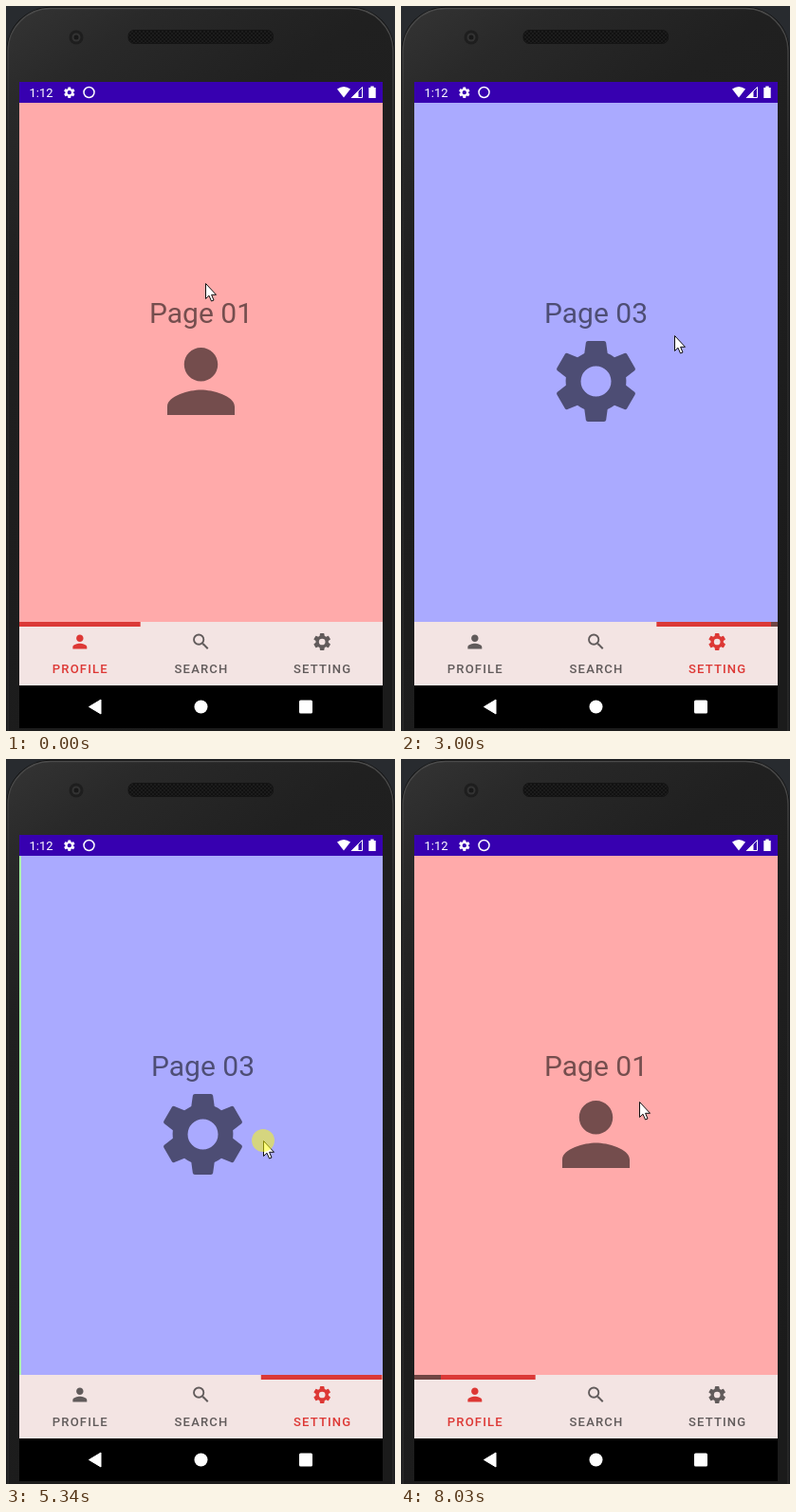
An HTML page for the animation above (9.47 s loop, 410x764 px).

```html
<!DOCTYPE html>
<html lang="en">
<head>
<meta charset="utf-8">
<title>Pager with tabs</title>
<style>
  html, body { margin: 0; width: 100%; height: 100%; overflow: hidden; background: #282b2f; }
  svg { display: block; width: 410px; height: 764px; font-family: Roboto, "Noto Sans", sans-serif; }
  .title { font-size: 30px; text-anchor: middle; }
  .ink { fill: #000; fill-opacity: .54; }
  .tab { fill: #615b5b; }
  .tab.on { fill: #dd3835; }
  .tab text { font-size: 13.05px; font-weight: 500; letter-spacing: 1.165px; text-anchor: middle; }
</style>
</head>
<body>
<svg viewBox="0 0 410 764">
  <defs>
    <linearGradient id="shell" x2=".35" y2="1">
      <stop offset="0" stop-color="#343434"/>
      <stop offset=".12" stop-color="#292929"/>
      <stop offset=".3" stop-color="#202020"/>
      <stop offset="1" stop-color="#1b1b1b"/>
    </linearGradient>
    <linearGradient id="rim" x2="0" y2="1">
      <stop offset="0" stop-color="#4a4a4a"/>
      <stop offset=".2" stop-color="#2b2b2b"/>
    </linearGradient>
    <pattern id="mesh" width="4" height="4" patternUnits="userSpaceOnUse">
      <rect width="4" height="4" fill="#1c1c1c"/>
      <circle cx="1" cy="1" r=".9" fill="#0b0b0b"/>
      <circle cx="3" cy="3" r=".9" fill="#0b0b0b"/>
    </pattern>
    <clipPath id="view"><rect x="14" y="102" width="383" height="614"/></clipPath>
    <path id="person" d="M12 12c2.21 0 4-1.79 4-4s-1.79-4-4-4-4 1.79-4 4 1.79 4 4 4zm0 2c-2.67 0-8 1.34-8 4v2h16v-2c0-2.66-5.33-4-8-4z"/>
    <g id="lens">
      <circle cx="9.5" cy="9.5" r="5.5" fill="none" stroke="currentColor" stroke-width="2"/>
      <path d="M14.23 14.43L15.5 13.900 20.490 19 19 20.490 14 15.500Z" fill="currentColor"/>
    </g>
    <path id="gear" fill-rule="evenodd"/>
  </defs>

  <!-- phone body -->
  <rect x=".5" y=".8" width="409" height="820" rx="47" fill="#0d0d0d"/>
  <rect x="2" y="2.500" width="406" height="820" rx="45" fill="url(#shell)" stroke="url(#rim)" stroke-width="1.500"/>
  <rect x="129" y="25.500" width="152.500" height="14" rx="6" fill="url(#mesh)" stroke="#141414"/>
  <circle cx="74" cy="33" r="7.500" fill="#1e1e1e"/>
  <circle cx="74" cy="33" r="4.500" fill="#333"/>
  <circle cx="74" cy="33" r="2.500" fill="#191919"/>

  <!-- status bar -->
  <rect x="14" y="80" width="383" height="22" fill="#3700b0"/>
  <g fill="#fff">
    <text x="24.500" y="95.500" font-size="13">1:12</text>
    <use href="#gear" transform="translate(59.600 84) scale(.6)"/>
    <circle cx="87.500" cy="91" r="5.500" fill="none" stroke="#fff" stroke-width="1.500"/>
    <path d="M349 87.500Q356 82.500 363 87.500L356 96.500Z"/>
    <path d="M375.500 85.500V96.500H364.500Z" fill="none" stroke="#fff"/>
    <path d="M371.500 89V97H363.500Z"/>
    <path d="M384.300 84.500h3.400v1.500h2v11h-7.400v-11h2z"/>
  </g>

  <g clip-path="url(#view)">
    <g id="pages"></g>
    <rect x="14" y="649" width="383" height="67" fill="#f3e4e3"/>
    <rect id="bar" y="649" height="5" fill="#db3937"/>
    <rect id="trail" y="649" height="5" fill="#704543"/>
    <g id="tabs"></g>
  </g>

  <!-- navigation bar -->
  <rect x="14" y="716" width="383" height="45" fill="#000"/>
  <g fill="#fff">
    <path d="M87.500 738.500L100 731V746Z" stroke="#fff" stroke-linejoin="round"/>
    <circle cx="205.500" cy="738.500" r="7"/>
    <rect x="309" y="731.500" width="14" height="14" rx="1.500"/>
  </g>

  <g id="pointer">
    <path d="M.5.500V16.500L4 13.200 6.500 19 9 18 6.600 12.300H11.500Z" fill="#fff" stroke="#111" stroke-linejoin="round"/>
    <circle id="press" r="12" fill="#ff0" opacity=".5"/>
  </g>
</svg>

<script>
const LOOP = 9470, STEP = LOOP / 130;
const LEFT = 14, WIDTH = 383, TAB = WIDTH / 3;
const SWIPE = 580, GLIDE = 160, PRESS = 185;
const $ = id => document.getElementById(id);

const tabs = [
  { label: "PROFILE", icon: "person", color: "#ffaaaa" },
  { label: "SEARCH", icon: "lens", color: "#aaffaa" },
  { label: "SETTING", icon: "gear", color: "#aaaaff" }
];

// The pointer arrives at x, y and from the time `at` swipes by dx, dy.
const swipes = [
  { arrive: 900, at: 1330, x: 246, y: 310, dx: -111, dy: 2 },
  { arrive: 2350, at: 2420, x: 300, y: 345, dx: -110, dy: 2 },
  { arrive: 2950, at: 3230, x: 288, y: 347, dx: -111, dy: 8 },
  { arrive: 4170, at: 4390, x: 154, y: 381, dx: 110, dy: 12 },
  { arrive: 5270, at: 5306, x: 264, y: 402, dx: 70, dy: 0 },
  { arrive: 6450, at: 6503, x: 340, y: 402, dx: -100, dy: -4 },
  { arrive: 6990, at: 7450, x: 350, y: 390, dx: -99, dy: -29 }
];
const rest = { at: 0, x: 210, y: 292, dx: 0, dy: 0, dir: 1, from: 0, to: 0 };

// Pages wrap around in both directions.
swipes.reduce((page, s) => {
  s.dir = -Math.sign(s.dx);
  s.from = page;
  return s.to = (page + s.dir + 3) % 3;
}, 0);

const clamp = v => Math.min(1, Math.max(0, v));
const mix = (a, b, k) => a + (b - a) * k;

// One tooth, mirrored and turned six times, around a round hole.
function gearPath() {
  const half = [[1.92, -9.6], [2.33, -9.6], [2.4, -9.19], [2.75, -6.65]];
  const tooth = [...half.map(([x, y]) => [-x, y]).reverse(), ...half];
  let d = "";
  for (let i = 0; i < 6; i++) {
    const c = Math.cos(i * Math.PI / 3), s = Math.sin(i * Math.PI / 3);
    const p = tooth.map(([x, y]) => `${12 + x * c - y * s} ${12 + x * s + y * c}`);
    d += `${i ? "A7.2 7.2 0 0 1 " : "M"}${p[0]}L${p[1]}Q${p[2]} ${p[3]}L${p[4]}Q${p[5]} ${p[6]}L${p[7]}`;
  }
  return d + "ZM12 15.6a3.6 3.6 0 1 1 0-7.2 3.6 3.6 0 1 1 0 7.2Z";
}

function build() {
  $("gear").setAttribute("d", gearPath());
  $("lens").innerHTML = $("lens").innerHTML.replaceAll("currentColor", "context-fill");
  $("lens").querySelector("circle").removeAttribute("stroke");
  $("lens").innerHTML = `<path fill-rule="evenodd" d="M9.5 3a6.5 6.5 0 1 0 0 13 6.5 6.5 0 1 0 0-13Z
    M9.5 5a4.5 4.5 0 1 1 0 9 4.5 4.5 0 1 1 0-9Z"/><path d="M14 14.7L14.700 14H15.500L20.490 19 19 20.490 14 15.500Z"/>
    <path d="M12.600 13.800L13.800 12.600 15.200 14 14 15.200Z"/>`;
  $("bar").setAttribute("width", TAB);
  tabs.forEach(({ label, icon, color }, i) => {
    const x = LEFT + TAB * (i + .5);
    $("pages").innerHTML += `<g><rect x="14" y="102" width="383.5" height="547" fill="${color}"/>
      <g class="ink"><text class="title" x="205.500" y="334">Page 0${i + 1}</text></g>
      <g opacity=".54"><use href="#${icon}" transform="translate(152.250 342.250) scale(4.438)"/></g></g>`;
    $("tabs").innerHTML += `<g class="tab"><text x="${x + .5}" y="702.500">${label}</text>
      <use href="#${icon}" transform="translate(${x - 11.18} 658.800) scale(.932)"/></g>`;
  });
}

// The picture changes on an even beat.
const snap = t => Math.max(0, (Math.floor(t / STEP - .15) + .27) * STEP);

// Page follows the drag until the release, then settles.
function progress(dt) {
  const release = 217, reach = .546;
  if (dt < release) return reach * clamp(dt / release) ** 2.5;
  return 1 - (1 - reach) * (1 - clamp((dt - release) / (SWIPE - release))) ** 1.45;
}

function drag(s, t) {
  const k = 1 - (1 - clamp((t - s.at) / SWIPE)) ** 1.8;
  return [s.x + s.dx * k, s.y + s.dy * k];
}

function pointerAt(t) {
  const i = swipes.filter(s => t >= s.arrive - GLIDE).length;
  if (!i) return drag(rest, t);
  const s = swipes[i - 1], leave = s.arrive - GLIDE;
  if (t >= s.arrive) return drag(s, t);
  const [x, y] = drag(swipes[i - 2] || rest, leave);
  const k = (t - leave) / GLIDE;
  return [mix(x, s.x, k), mix(y, s.y, k)];
}

function draw(t) {
  const s = swipes.filter(s => s.at <= t).pop() || rest;
  const { from, to, dir } = s;
  const p = progress(t - s.at);

  [...$("pages").children].forEach((page, i) => {
    const x = (i === to ? dir * (1 - p) : -dir * p) * WIDTH;
    page.style.display = i === to || (i === from && p < 1) ? "" : "none";
    page.setAttribute("transform", `translate(${from === to ? 0 : Math.round(x)} 0)`);
  });

  const barX = LEFT + TAB * mix(from, to, p);
  const tail = p > .999 ? 7 * (to - from) ** 2 : 0;
  $("bar").setAttribute("x", barX);
  $("trail").setAttribute("x", to > from ? barX + TAB - tail : barX);
  $("trail").setAttribute("width", tail);

  const selected = p > .5 ? to : from;
  [...$("tabs").children].forEach((tab, i) => tab.classList.toggle("on", i === selected));

  const [x, y] = pointerAt(t);
  $("pointer").setAttribute("transform", `translate(${Math.round(x)} ${Math.round(y)})`);
  $("press").style.display = s !== rest && t < s.at + PRESS ? "" : "none";
}

const begin = performance.now();
function tick() {
  draw(snap((performance.now() - begin) % LOOP));
  requestAnimationFrame(tick);
}
build();
tick();
</script>
</body>
</html>
```
